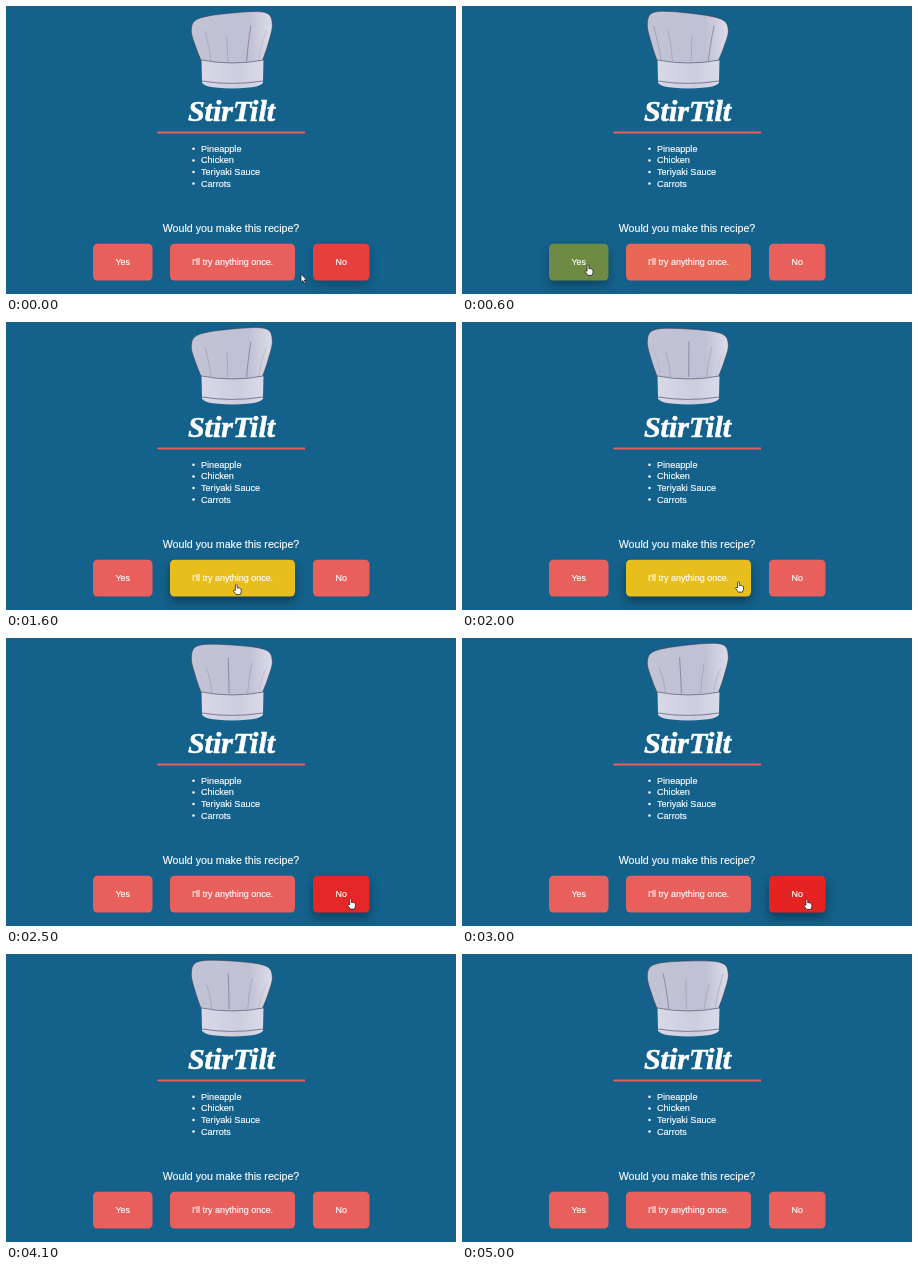
An HTML page for the animation above (5.1 s loop, 450 by 288 pixels).

```html
<!DOCTYPE html>
<html lang="en">
<head>
<meta charset="utf-8">
<title>StirTilt</title>
<style>
  html, body { margin: 0; width: 100%; height: 100%; overflow: hidden; background: #14618b; }
  svg { display: block; width: 450px; height: 288px; }
  text { fill: #fff; stroke: #fff; stroke-width: .15px; font-family: "Liberation Sans", Arial, sans-serif; }
  .title { font: italic bold 30px "Liberation Serif", serif; stroke-width: .6px; }
  .list text { font-size: 9.1px; }
  .ask { font-size: 10.67px; }
  .label { font-size: 8.95px; }
  .mid { text-anchor: middle; }
  .ink { stroke: #3a3a50; stroke-width: .6px; stroke-linejoin: round; }
  .soft { fill: none; stroke: #66667f; stroke-width: .8px; stroke-linecap: round; }
  .cursor path { fill: #fff; stroke: #111; stroke-width: .7px; stroke-linejoin: round; }
</style>
</head>
<body>
<svg viewBox="0 0 450 288">
  <defs>
    <linearGradient id="cloth">
      <stop offset="0" stop-color="#c3c3d6"/>
      <stop offset=".7" stop-color="#c0c0d4"/>
      <stop offset="1" stop-color="#dcdce9"/>
    </linearGradient>
    <linearGradient id="bandFill">
      <stop offset="0" stop-color="#d8d8e7"/>
      <stop offset=".6" stop-color="#cdcdde"/>
      <stop offset="1" stop-color="#dadae8"/>
    </linearGradient>
  </defs>

  <path id="crown" class="ink" fill="url(#cloth)"/>
  <g id="pleats"></g>
  <path fill="url(#bandFill)" d="M195.500 54Q226 60 257.500 54L257 75Q259 82 226 82.500Q194 82 196 75Z"/>
  <path class="soft" d="M195.500 54Q226 60 257.500 54M196 75Q226 80 257 75"/>

  <text class="title mid" x="225.500" y="115">StirTilt</text>
  <rect x="151.500" y="125.500" width="147.500" height="2" fill="#e95f5c"/>
  <g id="list" class="list"></g>
  <text class="ask mid" x="225" y="226.300">Would you make this recipe?</text>
  <g id="buttons"></g>
  <g id="cursor" class="cursor">
    <path id="arrow" d="M0 0V8.200L1.900 6.500L3.100 9.300L4.500 8.700L3.300 6H5.700Z"/>
    <path id="hand" d="M-.9 .8Q0-.6 .9 .8V4Q3 3.300 5 5.200V7.800L4 10.600H-.2L-2.900 6.800Q-2.700 5.300-.9 6.500Z"/>
  </g>
</svg>
<script>
const LOOP = 5100, STEP = 100, FADE = 400, SPIN = 1600;
const $ = id => document.getElementById(id);
const clamp = v => Math.min(1, Math.max(0, v));
const ease = u => 1 - (1 - clamp(u)) ** 2.2;

function add(parent, tag, attrs, text = '') {
  const el = document.createElementNS('http://www.w3.org/2000/svg', tag);
  for (const key in attrs) el.setAttribute(key, attrs[key]);
  el.textContent = text;
  return parent.appendChild(el);
}

['Pineapple', 'Chicken', 'Teriyaki Sauce', 'Carrots'].forEach((item, i) => {
  const y = 145.8 + i * 11.6;
  add($('list'), 'circle', { cx: 187.5, cy: y - 3, r: 1.25, fill: '#fff' });
  add($('list'), 'text', { x: 195, y }, item);
});

// Hover spans are [enter, leave] in ms.
const REST = [233, 95, 92];
const buttons = [
  { text: 'Yes', x: 87, w: 59.5, hot: [76, 150, 60], spans: [[400, 1030]] },
  { text: "I'll try anything once.", x: 164, w: 125, hot: [232, 190, 28], spans: [[50, 330], [1140, 2130]] },
  { text: 'No', x: 307, w: 56.5, hot: [228, 35, 34], spans: [[-LOOP, -100], [2220, 3460]] }
];
for (const b of buttons) {
  b.box = add($('buttons'), 'rect', { x: b.x, y: 237.7, width: b.w, height: 36.8, rx: 4.5 });
  add($('buttons'), 'text', { class: 'label mid', x: b.x + b.w / 2, y: 259.2 }, b.text);
}

// Stops of the pointer as [time, x, y], joined by straight moves.
const stops = [
  [0, 295, 268], [500, 126, 258], [900, 126, 261], [1200, 184, 264.5],
  [2000, 276.5, 259.5], [2500, 344.5, 260.5], [3200, 345, 261], [3600, 372, 296]
];

function pointer(t) {
  const i = stops.findIndex(s => s[0] > t);
  if (i < 0) return [-20, -20];
  const [t0, x0, y0] = stops[i - 1], [t1, x1, y1] = stops[i];
  const u = (t - t0) / (t1 - t0);
  return [x0 + (x1 - x0) * u, y0 + (y1 - y0) * u];
}

// Catmull-Rom curve through the points.
function curve(pts) {
  let d = 'M' + pts[0];
  for (let i = 0; i < pts.length - 1; i++) {
    const p = pts[i], q = pts[i + 1], o = pts[i - 1] || p, r = pts[i + 2] || q;
    d += `C${p.map((v, k) => v + (q[k] - o[k]) / 6)} ${q.map((v, k) => v - (r[k] - p[k]) / 6)} ${q}`;
  }
  return d;
}

// Half profile of the crown as [distance from the middle, y], from the band up.
const profile = [[30.5, 55], [36, 40], [40.5, 21], [33, 9.5]];
const pleats = Array.from({ length: 9 }, () => add($('pleats'), 'path', { class: 'soft' }));

// The crown is higher on one side, so turning it makes the top rock.
function drawHat(t) {
  const turn = 2 * Math.PI * (t + 140) / SPIN, tilt = Math.cos(turn);
  const place = side => ([r, y]) => [225.8 + side * r, y - side * tilt * r * (55 - y) / 420];
  const pts = [...profile.map(place(-1)), [225.8, 7], ...profile.map(place(1)).reverse()];
  $('crown').setAttribute('d', curve(pts) + 'Q226 62 195.3 55Z');

  pleats.forEach((p, i) => {
    const a = turn + 2 * Math.PI * i / pleats.length, s = Math.sin(a);
    const foot = 226 + 28 * s, top = 226 + 36 * s;
    p.setAttribute('d', `M${foot} 55Q${foot + s * 2} 40 ${top} ${20 + 5 * (i % 3)}`);
    p.style.opacity = clamp(Math.cos(a) * 2) * (i % 3 ? .35 : .75);
  });
}

function drawButton(b, t) {
  const level = b.spans.reduce((sum, [on, off]) =>
    sum + ease((t - on) / FADE) - ease((t - off) / FADE), 0);
  b.box.style.fill = `rgb(${REST.map((c, i) => Math.round(c + (b.hot[i] - c) * level))})`;
  b.box.style.filter = level > .01 ? `drop-shadow(0 5px 5px rgba(0,0,0,${.36 * level}))` : 'none';
}

function drawCursor(t) {
  const over = buttons.some(b => b.spans.some(([on, off]) => t >= on && t < off));
  $('cursor').setAttribute('transform', `translate(${pointer(t)})`);
  $('hand').style.display = over ? '' : 'none';
  $('arrow').style.display = over ? 'none' : '';
}

const start = performance.now();
function frame() {
  const t = Math.floor((performance.now() - start) % LOOP / STEP) * STEP;
  drawHat(t);
  buttons.forEach(b => drawButton(b, t));
  drawCursor(t);
  requestAnimationFrame(frame);
}
frame();
</script>
</body>
</html>
```
